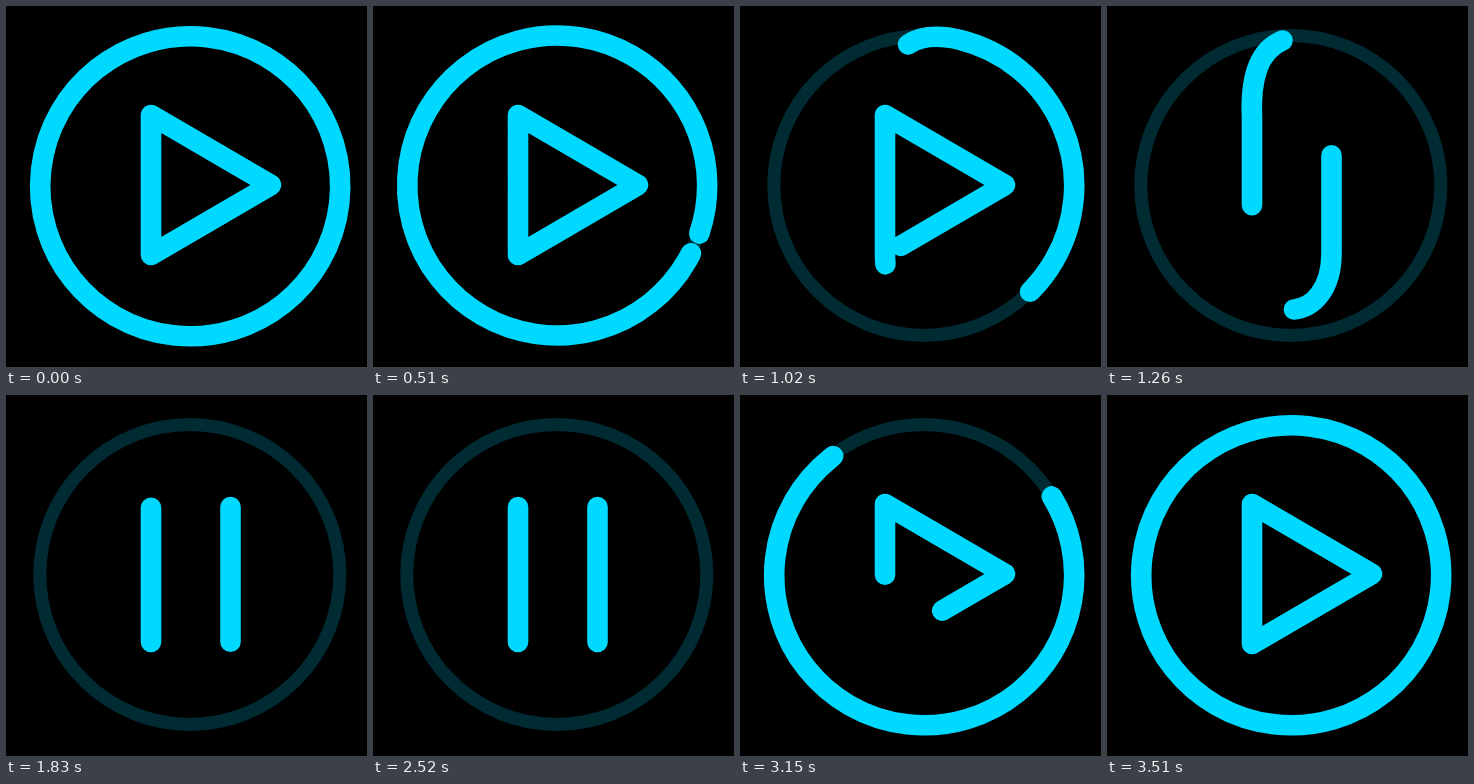
Recreate the animation shown at these times as an HTML page. Size 361 by 361 pixels, loop 4.47 s.

```html
<!DOCTYPE html>
<html lang="en">
<head>
<meta charset="utf-8">
<title>Play / pause</title>
<style>
  html, body { margin: 0; width: 100%; height: 100%; overflow: hidden; background: #000; }
  svg { display: block; width: 100vw; height: 100vh; }
  path, circle { fill: none; stroke: #00d9ff; stroke-width: 20.6; stroke-linecap: round; stroke-linejoin: round; }
  .ring { stroke: #002b33; stroke-width: 13; }
</style>
</head>
<body>
<svg viewBox="0 0 361 361">
  <circle class="ring" cx="183.8" cy="179.4" r="150"/>
  <path id="ringLine"/>
  <path id="triLine"/>
</svg>
<script>
  const LOOP = 4470, STEP = 30;
  const R = 150, BAR = 135, CIRCLE = 2 * Math.PI * R;
  const TRI = 140 + 2 * Math.hypot(120, 70);

  // Point on the circle, degrees clockwise from the top
  const at = (deg, cy) => {
    const a = deg * Math.PI / 180;
    return `${184.2 + R * Math.sin(a)} ${cy - R * Math.cos(a)}`;
  };
  const arc = (deg, cy) => `A${R} ${R} 0 0 0 ${at(deg, cy)}`;
  const turn = (deg, cy) => arc(deg - 180, cy) + arc(deg, cy);

  const measure = d => {
    const p = document.createElementNS('http://www.w3.org/2000/svg', 'path');
    p.setAttribute('d', d);
    return p.getTotalLength();
  };

  const ease = (p, n) => p < .5 ? (2 * p) ** n / 2 : 1 - (2 - 2 * p) ** n / 2;

  // One end of a line, sliding along its path
  const slide = (from, to, start, time, n) => t =>
    from + (to - from) * ease(Math.min(1, Math.max(0, (t - start) / time)), n);

  const toPause = {
    ring: `M${at(120, 179.5)}${turn(120, 179.5)}${arc(14, 179.5)}C165 20.6 142 50 145 112V247`,
    tri: 'M145 249L265 179L145 109V249C145 322 224.5 322 224.5 247V112'
  };
  const ringEnd = measure(toPause.ring), triEnd = measure(toPause.tri);

  const lead = 'M224.5 247V112C224.5 13 130 30.8 ' + at(-38.5, 180.3);
  const toPlay = {
    ring: lead + turn(-38.5, 180.3),
    tri: 'M145 112V249L265 179L145 109V249L265 179'
  };
  const ringSeam = measure(lead), triSeam = 204;

  const pausing = {
    ring: [toPause.ring, slide(0, ringEnd - BAR, 278, 1318, 3), slide(CIRCLE, ringEnd, 307, 1326, 3)],
    tri: [toPause.tri, slide(0, triEnd - BAR, 920, 500, 3), slide(TRI, triEnd, 920, 500, 3)]
  };
  const playing = {
    ring: [toPlay.ring, slide(0, ringSeam, 2555, 688, 3), slide(BAR, ringSeam + CIRCLE, 2570, 940, 3)],
    tri: [toPlay.tri, slide(0, triSeam, 2532, 647, 2), slide(BAR, triSeam + TRI, 2543, 970, 2)]
  };

  const ringLine = document.getElementById('ringLine');
  const triLine = document.getElementById('triLine');

  function draw(el, [d, tail, head], t) {
    const a = tail(t);
    el.setAttribute('d', d);
    el.setAttribute('stroke-dasharray', `${head(t) - a} 5000`);
    el.setAttribute('stroke-dashoffset', -a);
  }

  const origin = performance.now();
  function frame() {
    let t = Math.max(0, performance.now() - origin) % LOOP;
    t = Math.floor(t / STEP) * STEP;
    if (t < 300) t += LOOP;
    const set = t < 2520 ? pausing : playing;
    draw(ringLine, set.ring, t);
    draw(triLine, set.tri, t);
    requestAnimationFrame(frame);
  }
  frame();
</script>
</body>
</html>
```
